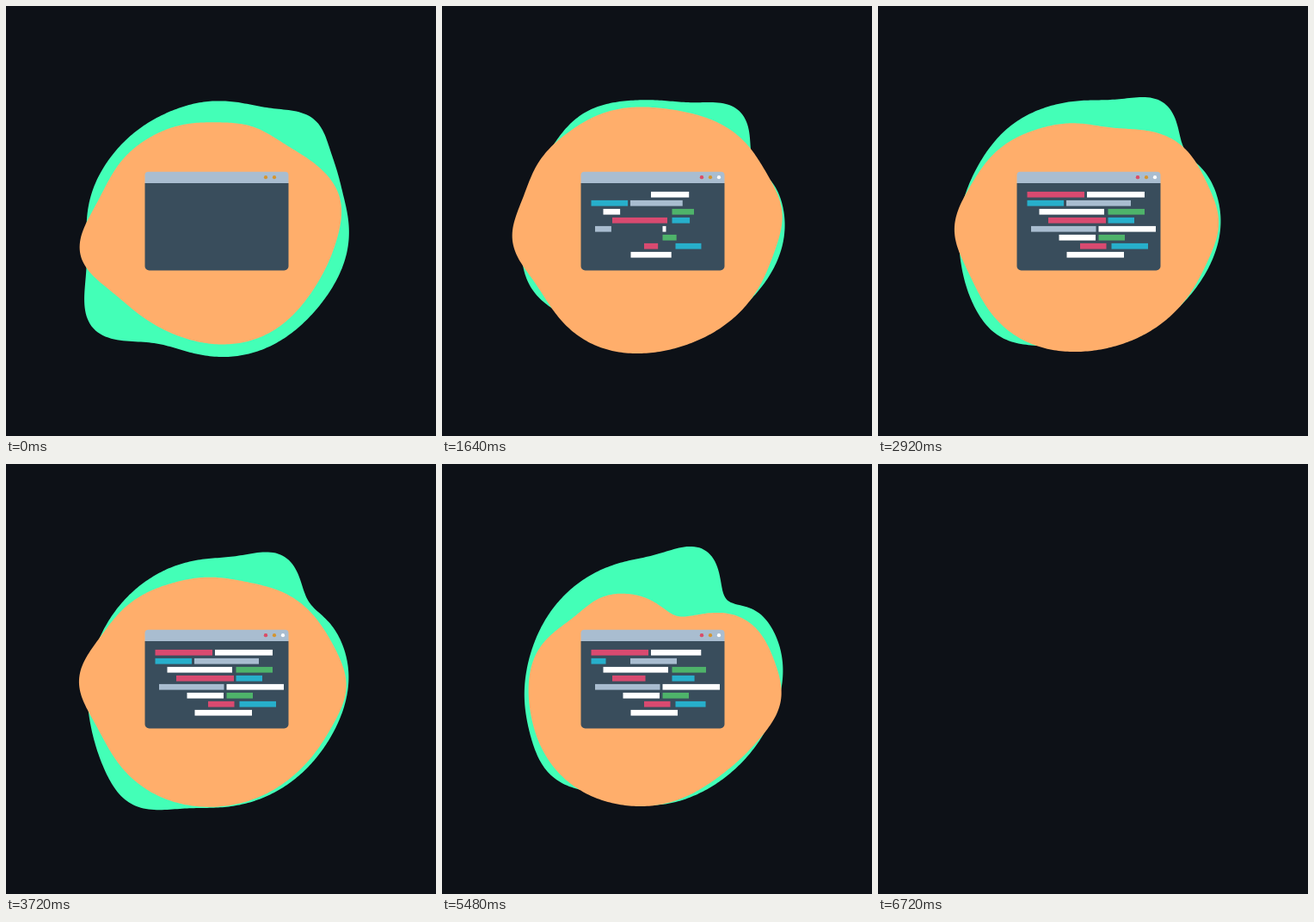
These frames come from a looping animation (500x500 px, 6.76 s). An HTML page with a canvas:

```html
<!DOCTYPE html>
<html lang="en">
<head>
<meta charset="utf-8">
<title>Code window</title>
<style>
html, body { margin: 0; width: 100%; height: 100%; overflow: hidden; background: #0d1117; }
canvas { display: block; width: 500px; height: 500px; }
</style>
</head>
<body>
<canvas id="stage" width="500" height="500"></canvas>
<script>
const ctx = document.getElementById('stage').getContext('2d');
const LOOP = 6760, STEP = 40, CX = 245, CY = 255;
const RED = '#d94a70', CYAN = '#27afcb', GREEN = '#4eb36a', GREY = '#a9bdd0', WHITE = '#fff', AMBER = '#d4952f';
const clamp = v => Math.max(0, Math.min(1, v));
const bell = v => Math.exp(-v * v);

// Each blob is a slowly turning circle pulled in and out by soft lobes.
// A lobe has an angle, a width and its pull at each beat; the last pull holds.
const BEATS = [0, 600, 1640, 2920, 4520, 5480];
const mint = {
  color: '#43ffb7', radius: 145, spin: -0.0042,
  lobes: [
    [8, 28, 9],
    [75, 40, 9, -3, -7, -5, 2, -7],
    [140, 17, 39, 0, -3, 16, 28, -6],
    [160, 20, 6, 4, 14, 12, 12, 15],
    [190, 22, 5],
    [245, 20, -2, 3, 8, 2, -3, 0],
    [313, 15, 22],
    [334, 11, 4, -17, -11, -8, -6, -20]
  ]
};
const peach = {
  color: '#ffae6b', radius: 142, spin: 0.0036,
  lobes: [
    [33, 28, -7, 0, 1, 0, -5, -9],
    [115, 35, -6, 7, 13, 12, 0, 9],
    [168, 17, 21, 25, 20, 13, 22, 1],
    [200, 20, -4, 13, 9, 0, 0, -18],
    [235, 26, -11, 3, 2, -13, -12, -25],
    [272, 27, -20, -2, -6, -24, -11, -55],
    [310, 22, -16, -5, 3, 4, -9, 0],
    [348, 16, 6, 9]
  ]
};

function drawBlob({ color, radius, spin, lobes }, t) {
  const k = BEATS.findLastIndex(beat => beat <= t);
  const u = k < BEATS.length - 1 ? (t - BEATS[k]) / (BEATS[k + 1] - BEATS[k]) : 0;
  const pulls = lobes.map(([at, width, ...pull]) => {
    const [from, to] = [k, k + 1].map(i => pull[Math.min(i, pull.length - 1)]);
    return { at, width, pull: from + (to - from) * u };
  });
  ctx.beginPath();
  for (let deg = 0; deg < 360; deg++) {
    let r = radius;
    for (const { at, width, pull } of pulls) {
      r += pull * bell(((deg - at + 540) % 360 - 180) / width);
    }
    const angle = (deg + spin * t) * Math.PI / 180;
    ctx.lineTo(CX + r * Math.cos(angle), CY + r * Math.sin(angle));
  }
  ctx.fillStyle = color;
  ctx.fill();
}

// Each line of code holds bars: left, width, colour, start time.
const GROW = 800, HOLD = 4264;
const lines = [
  [[173.5, 66.5, RED, 1650], [243, 67, WHITE, 1112]],
  [[173.5, 42.5, CYAN, 736], [219, 75, GREY, 992]],
  [[187.5, 75.5, WHITE, 1432], [267.5, 42.5, GREEN, 1160]],
  [[198, 67, RED, 876], [267.5, 30.5, CYAN, 1100]],
  [[178, 75.5, GREY, 1440], [256.5, 66.5, WHITE, 1592]],
  [[210.5, 42.5, WHITE, 1650], [256.5, 30.5, GREEN, 1216]],
  [[235, 30.5, RED, 1216], [271.5, 42.5, CYAN, 1076]],
  [[219.5, 66.5, WHITE, 1072]]
];

function drawBox(color, y, height, corners) {
  ctx.fillStyle = color;
  ctx.beginPath();
  ctx.roundRect(161.5, y, 167, height, corners);
  ctx.fill();
}

function drawDot(x, color, alpha = 1) {
  ctx.globalAlpha = alpha;
  ctx.fillStyle = color;
  ctx.beginPath();
  ctx.arc(x, 199.2, 2.1, 0, 7);
  ctx.fill();
  ctx.globalAlpha = 1;
}

function drawWindow(t) {
  drawBox('#394d5c', 206, 101.5, [0, 0, 5, 5]);
  drawBox(GREY, 192.8, 13.2, [4, 4, 0, 0]);
  drawDot(302, AMBER);
  drawDot(302, RED, clamp(t / 1100));
  drawDot(312, AMBER);
  drawDot(322, WHITE, clamp((t - 600) / 800));
  lines.forEach((bars, row) => {
    for (const [left, width, color, start] of bars) {
      const shown = clamp((t - start) / GROW) - clamp((t - start - HOLD) / GROW);
      ctx.fillStyle = color;
      ctx.fillRect(left, 215.9 + row * 10, width * shown, 6.7);
    }
  });
}

function draw(now) {
  const t = Math.floor(now % LOOP / STEP) * STEP;
  ctx.fillStyle = '#0d1117';
  ctx.fillRect(0, 0, 500, 500);
  if (t < LOOP - STEP) {
    drawBlob(mint, t);
    drawBlob(peach, t);
    drawWindow(t);
  }
}

const begin = performance.now();
function tick() {
  draw(performance.now() - begin);
  requestAnimationFrame(tick);
}
tick();
</script>
</body>
</html>
```
